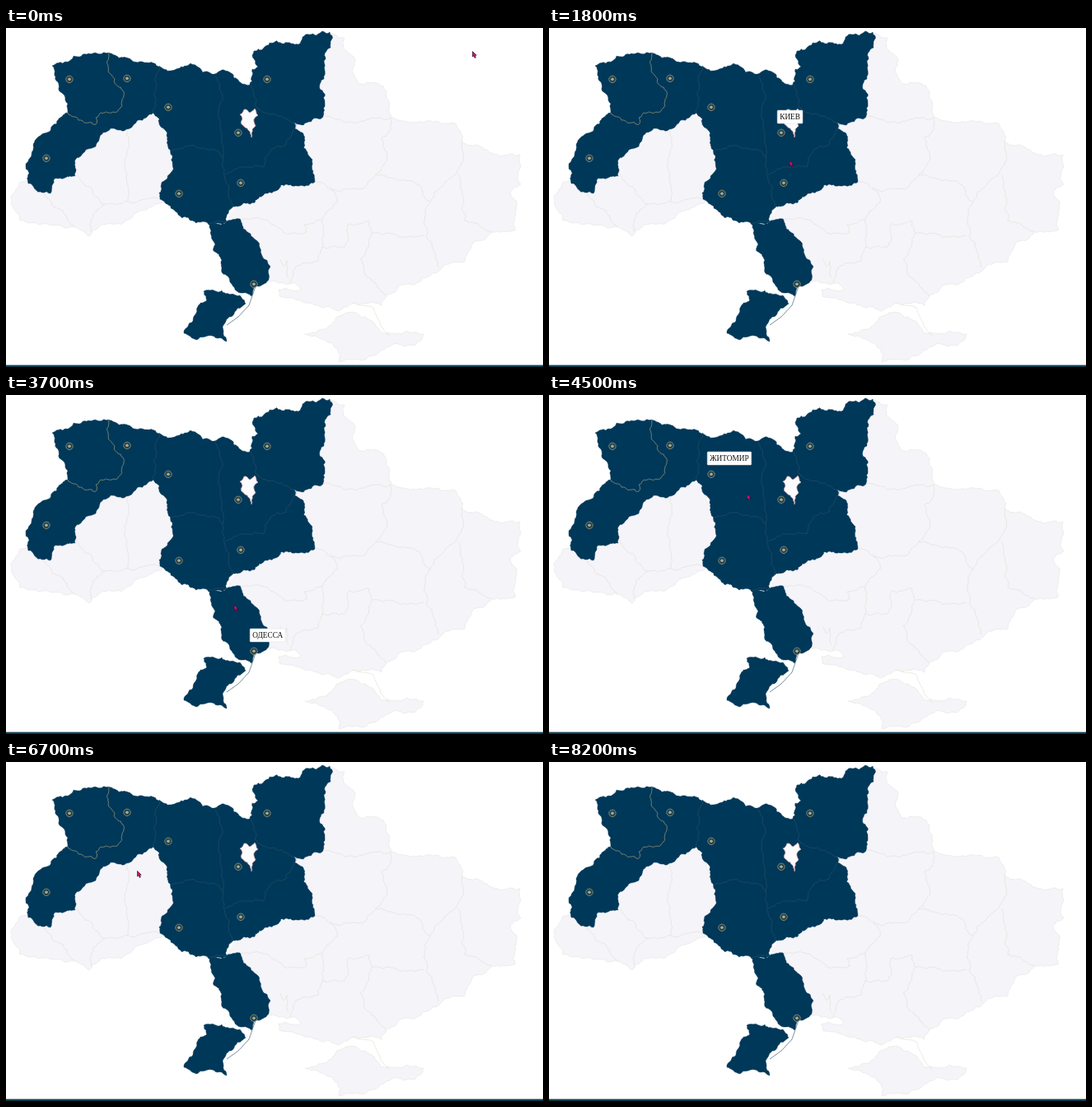
Animation of 652x412 px, one loop 8700 ms. Source, as an HTML page:

```html
<!DOCTYPE html>
<html lang="ru">
<head>
<meta charset="utf-8">
<title>Карта</title>
<style>
  html, body { margin: 0; width: 100%; height: 100%; overflow: hidden; background: #fff; }
  svg { display: block; width: 652px; height: 412px; }
  path { stroke-linejoin: round; fill: none; stroke-width: .7; }
  .land { fill: #f5f4f9; stroke: #e8e6e0; }
  .border { stroke: #e4e1d4; }
  .navy { fill: #003859; stroke: #003859; stroke-width: .4; }
  .seam { stroke: #2a5268; stroke-width: .6; }
  .gold { stroke: #a39c78; }
  .hole { fill: #fbfafc; stroke: #d8a3a6; }
  .coast { stroke: #36566f; }
  .ring { fill: #a3966426; stroke: #8a8467; stroke-width: 1; }
  .dot { fill: #b8aa7e; }
  .tip { visibility: hidden; }
  .tip rect { fill: #fff; stroke: #d9dde2; stroke-width: .5; }
  .tip text { font: 9.3px "Liberation Serif", "Times New Roman", serif; fill: #111; }
  #cursor { fill: #d3127c; stroke: #2a1426; stroke-width: .7; }
</style>
</head>
<body>
<svg viewBox="0 0 652 412">
  <g id="map"></g>
  <rect y="409.6" width="652" height="2.4" fill="#0f3f52"/>
  <g id="marks"></g>
  <g id="tips"></g>
  <path id="cursor" d="M.5 .5V7L2 5.7L3.2 8.4L4.4 7.8L3.3 5.2H5.2Z"/>
</svg>
<script>
const $ = id => document.getElementById(id);

function add(parent, name, attrs) {
  const el = document.createElementNS("http://www.w3.org/2000/svg", name);
  for (const key in attrs) el.setAttribute(key, attrs[key]);
  parent.appendChild(el);
  return el;
}

let seed = 11;
function rand() {
  seed = (seed * 16807) % 2147483647;
  return seed / 2147483647 - 0.5;
}

// Midpoint displacement: a ragged line from a to b, without its first point
function fractal(a, b, rough) {
  const dx = b[0] - a[0], dy = b[1] - a[1], len = Math.hypot(dx, dy);
  if (len < 3) return [b];
  const off = rand() * rough * Math.min(1, 16 / len);
  const mid = [(a[0] + b[0]) / 2 - dy * off, (a[1] + b[1]) / 2 + dx * off];
  return [...fractal(a, mid, rough), ...fractal(mid, b, rough)];
}

function draw(cls, keys, rough = 0.35) {
  const pts = keys.split(" ").map(p => p.split(",").map(Number));
  const line = pts.flatMap((p, i) => i ? fractal(pts[i - 1], p, rough) : [p]);
  const d = "M" + line.map(p => p.map(v => v.toFixed(1)).join(" ")).join("L");
  add($("map"), "path", { class: cls, d });
}

// Pale land: east, south, west
draw("land", "350,115 380,50 393,5 411,12 409,24 424,40 421,54 428,67 453,68 461,76 468,109 491,115 519,114 546,116 553,137 584,148 601,156 624,154 622,178 625,190 612,199 620,211 618,246 590,248 566,263 556,285 534,287 513,302 463,324 456,337 420,335 404,344 380,338 332,326 331,318 358,317 346,310 318,308 300,300 271,228");
draw("land", "363,372 388,366 402,351 424,346 448,360 456,371 486,368 507,372 496,386 467,386 432,404 404,406 403,390 385,378 363,372");
draw("land", "30,186 18,187 6,207 17,234 46,238 85,242 101,253 113,242 141,238 162,222 192,209 215,180 180,95 125,115 45,180");
draw("border", "421,334 446,340 455,362 466,374", 0.15);

// Borders on the pale land
[
  "386,107 404,111 434,113 467,109 465,127 456,133 463,160 449,178",
  "375,187 404,199 432,196 449,178 475,185 501,190 515,212",
  "393,193 402,212 384,232 362,239 365,248 340,250 317,233 284,232",
  "384,232 384,266 411,266 416,238 441,235 445,249 470,250 507,252",
  "515,212 520,200 540,182 556,160 553,137",
  "515,212 507,237 519,270 525,291",
  "549,178 555,205 557,234 590,248",
  "445,249 430,281 434,296 461,326",
  "384,266 379,283 354,289 345,310",
  "333,281 337,290 341,283 343,304",
  "146,123 145,172 147,211",
  "84,174 103,194 121,214",
  "103,248 104,232 121,214 147,211 187,209",
  "40,199 62,219 83,241"
].forEach(keys => draw("border", keys));

// Highlighted regions
draw("navy", "56,46 69,43 82,34 100,31 125,30 150,37 171,42 190,49 192,110 179,103 160,112 146,123 127,122 118,127 109,144 92,154 84,164 84,180 59,183 54,201 44,200 27,189 24,165 33,143 56,119 75,103 71,82 61,64 56,46");
draw("navy", "186,46 200,52 217,46 231,46 250,56 272,54 282,63 296,69 299,50 306,47 301,28 320,18 355,20 360,11 393,5 394,24 386,40 386,62 382,75 387,88 385,107 365,115 349,115 362,140 372,160 375,187 341,190 316,201 271,221 268,236 246,239 226,234 205,222 187,208 188,193 200,176 202,155 195,130 179,103", 0.45);
draw("navy", "246,237 268,235 284,232 288,244 304,258 311,277 321,290 317,308 303,314 298,326 278,318 271,304 262,297 262,282 252,271 254,263 246,237");
draw("navy", "240,320 262,319 284,325 291,335 275,350 264,361 268,381 250,374 232,379 216,371 227,356 232,340 243,332 240,320");
draw("coast", "303,314 295,337 282,351 268,361", 0);

// Borders between them
[
  "186,47 181,65 182,95 179,103",
  "254,58 261,77 258,104 262,132 263,158 271,192 275,215 271,221",
  "201,149 229,143 252,148 263,157",
  "246,238 268,236",
  "266,178 292,169 313,169 321,149 340,142 352,117",
  "297,69 303,95 318,104 349,115"
].forEach(keys => draw("seam", keys));
draw("gold", "125,30 124,47 132,62 142,76 139,97 115,103 109,117 88,112 75,103", 0.45);
draw("hole", "284,105 289,99 296,103 302,98 306,106 301,114 303,119 299,123 298,133 293,122 286,117 287,110 284,105");

// Cities with their labels
const cities = {
  "ЛУЦК": [77, 62], "РОВНО": [147, 61], "ЖИТОМИР": [197, 96], "КИЕВ": [282, 127],
  "ЧЕРНИГОВ": [317, 62], "ЛЬВОВ": [49, 158], "ВИННИЦА": [210, 201],
  "ЧЕРКАССЫ": [285, 188], "ОДЕССА": [301, 311]
};
const tips = {};
for (const name in cities) {
  const [x, y] = cities[name];
  const at = { cx: x, cy: y + 0.3 };
  add($("marks"), "circle", { class: "ring", r: 4.2, ...at });
  add($("marks"), "circle", { class: "dot", r: 1.8, ...at });
  const tip = add($("tips"), "g", { class: "tip", transform: `translate(${x - 4.8} ${y - 27})` });
  const box = add(tip, "rect", { height: 16, rx: 1 });
  const label = add(tip, "text", { x: 3, y: 11.2 });
  label.textContent = name;
  box.setAttribute("width", label.getComputedTextLength() + 6);
  tips[name] = tip;
}

// Pointer moves: start, end, x, y; it rests in between
const moves = [
  [0, 200, 566, 28], [200, 1000, 306, 107], [1000, 1100, 281, 118],
  [1400, 2000, 297, 182], [2300, 2600, 241, 198], [2600, 3200, 287, 293],
  [3500, 4400, 240, 120], [4500, 5300, 118, 72], [5500, 5800, 85, 123],
  [5800, 6100, 66, 142], [6400, 6700, 159, 132], [6700, 7300, 345, 76],
  [7300, 8100, 617, 7]
];
// Label shown from each time on
const hovers = [
  [0, ""], [800, "ЧЕРНИГОВ"], [1100, "КИЕВ"], [1900, "ЧЕРКАССЫ"], [2500, "ВИННИЦА"],
  [2900, "ОДЕССА"], [3800, "ВИННИЦА"], [4300, "ЖИТОМИР"], [4900, "РОВНО"],
  [5400, "ЛУЦК"], [5900, "ЛЬВОВ"], [6600, ""], [6900, "ЖИТОМИР"],
  [7100, "КИЕВ"], [7200, "ЧЕРНИГОВ"], [7500, ""]
];
const LOOP = 8700, STEP = 100, EXIT = 8200;

function pointAt(t) {
  let [, , x, y] = moves[0];
  for (const [from, to, nx, ny] of moves) {
    const k = Math.min(1, Math.max(0, (t - from) / (to - from)));
    x += (nx - x) * k;
    y += (ny - y) * k;
  }
  return [x, y];
}

function render(now) {
  const t = Math.floor((now % LOOP) / STEP) * STEP;
  $("cursor").setAttribute("transform", `translate(${pointAt(t)})`);
  $("cursor").style.visibility = t < EXIT ? "visible" : "hidden";
  const active = hovers.filter(h => h[0] <= t).pop()[1];
  for (const name in tips) tips[name].style.visibility = name === active ? "visible" : "hidden";
}

const start = performance.now();
function tick() {
  render(performance.now() - start);
  requestAnimationFrame(tick);
}
tick();
</script>
</body>
</html>
```
